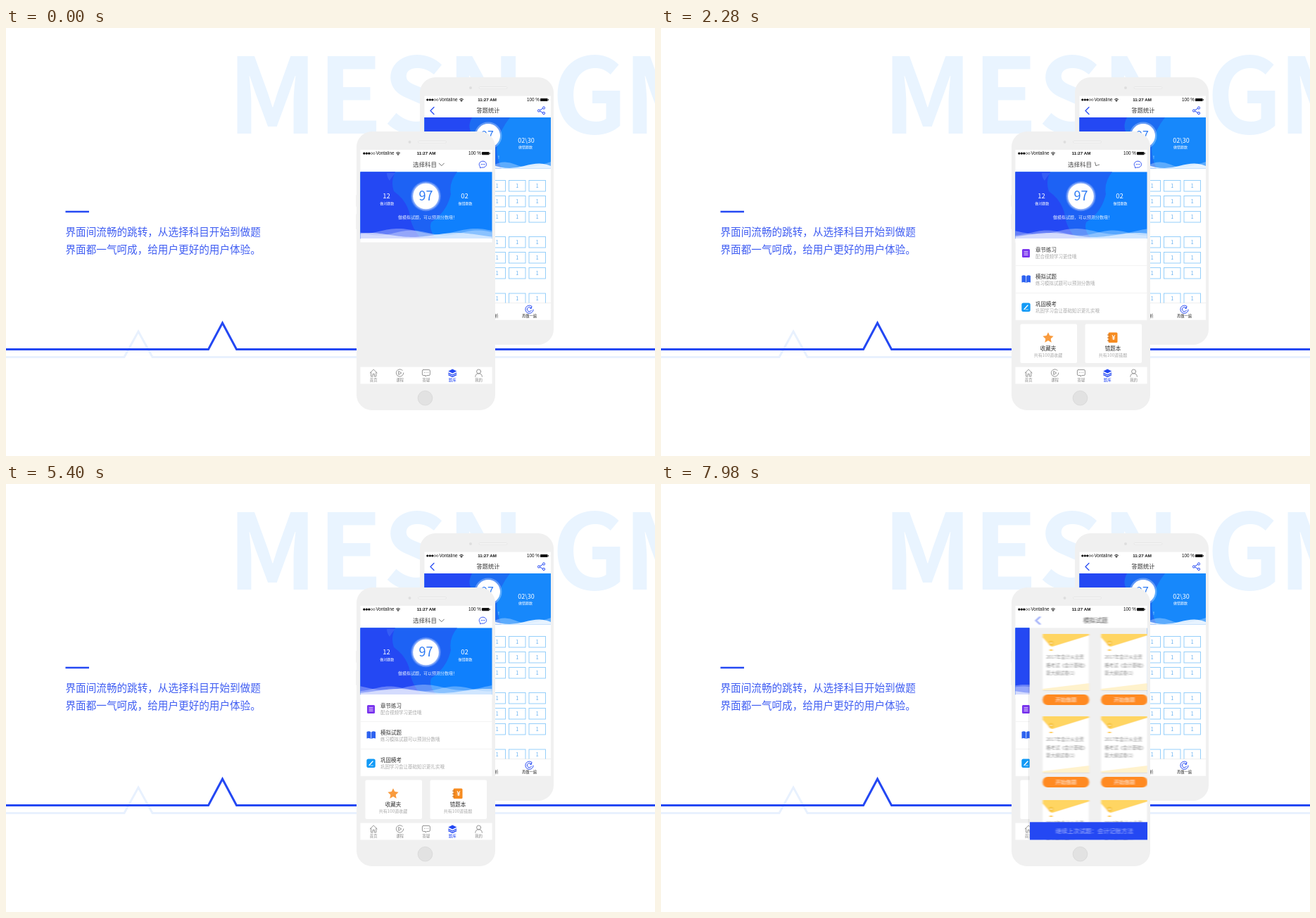
An HTML page for the animation above (8000 ms loop, 922 by 608 pixels).

```html
<!DOCTYPE html>
<html lang="zh-CN">
<head>
<meta charset="utf-8">
<title>App transitions</title>
<style>
html, body { margin: 0; width: 100%; height: 100%; overflow: hidden; background: #fff; }
svg { display: block; font-family: "Noto Sans CJK SC", "Noto Sans CJK JP", "Noto Sans CJK", sans-serif; }
.latin { font-family: "Liberation Sans", Arial, sans-serif; }
.line { fill: none; stroke-linecap: round; stroke-linejoin: round; }
</style>
</head>
<body>
<svg id="stage" width="922" height="608" viewBox="0 0 922 608"></svg>
<script>
const BLUE = '#2448f3', GREY = '#f0f0f0';
const stage = document.getElementById('stage');

const rect = (x, y, w, h, fill, more = '') =>
  `<rect x="${x}" y="${y}" width="${w}" height="${h}" fill="${fill}" ${more}/>`;
const circle = (x, y, r, fill, more = '') => `<circle cx="${x}" cy="${y}" r="${r}" fill="${fill}" ${more}/>`;
const path = (d, fill, more = '') => `<path d="${d}" fill="${fill}" ${more}/>`;
const line = (d, color, w = 1, more = '') =>
  `<path class="line" d="${d}" stroke="${color}" stroke-width="${w}" ${more}/>`;
const text = (s, x, y, size, fill, more = '') =>
  `<text x="${x}" y="${y}" font-size="${size}" fill="${fill}" ${more}>${s}</text>`;
const mid = (s, x, y, size, fill, more = '') => text(s, x, y, size, fill, `text-anchor="middle" ${more}`);
const group = (s, more) => `<g ${more}>${s}</g>`;
const at = (x, y, s) => group(s, `transform="translate(${x} ${y})"`);
const clip = (id, x, y, w, h) => `<clipPath id="${id}">${rect(x, y, w, h, '#000')}</clipPath>`;

// Phone shell with its top-left corner at x, y
function shell(x, y, w, h) {
  const c = x + w / 2;
  return rect(x - 1, y + 90, 3, 17, '#f3f3f3', 'rx="1"') + rect(x - 1, y + 117, 3, 22, '#f3f3f3', 'rx="1"') +
    rect(x, y, w, h, GREY, 'rx="22"') +
    circle(c - 23, y + 15, 2, '#dedede') +
    rect(c - 11, y + 13.5, 40, 2.6, '#f5f5f5', 'rx="1.3" stroke="#e0e0e0" stroke-width=".6"');
}

// Carrier, clock and battery; y is the middle of the row
function statusBar(x, right, center, y) {
  let s = '';
  for (let i = 0; i < 5; i++)
    s += circle(x + 1.8 + i * 3.5, y, 1.35, i < 3 ? '#111' : 'none', 'stroke="#111" stroke-width=".5"');
  s += text('Vontaline', x + 18.5, y + 2.2, 6.3, '#111');
  s += at(x + 50, y, line('M-2.6-.7Q0-3 2.6-.7M-1.5.7Q0-.6 1.5.7', '#111', .9) + circle(0, 1.9, .8, '#111'));
  s += mid('11:27 AM', center, y + 2.2, 6.2, '#111', 'font-weight="700"');
  s += text('100 %', right - 31, y + 2.2, 6.3, '#111');
  s += rect(right - 12, y - 2.1, 10.5, 4.2, '#111', 'rx=".7"') + rect(right - 1.2, y - .9, 1, 1.8, '#111');
  return group(s, 'class="latin"');
}

function backPhone() {
  let s = shell(588, 70, 190, 380) + rect(594.5, 96.5, 179.5, 318, '#fff');
  s += statusBar(597, 771, 683.5, 102) + mid('答题统计', 685, 120.3, 8.2, '#333');
  s += line('M608 112.5L603 117.5L608 122.5', BLUE, 1.2);
  s += line('M764 113.5L757 117.5L764 121', BLUE, 1);
  s += [[764, 113.5], [757, 117.5], [764, 121]].map(p => circle(...p, 1.6, '#fff', `stroke="${BLUE}"`)).join('');
  s += rect(594.5, 127, 179.5, 72.5, '#1788fb') + path('M594.5 127H716Q686 165 704 199.5H594.5Z', '#1c6cf2') +
    path('M594.5 127H662Q654 142 664 152Q674 168 676 199.5H594.5Z', BLUE);
  s += path('M690 196Q707 186 724 194T774 190V199.5H690Z', '#fff', 'opacity=".3"') +
    path('M690 194Q712 203 736 196T774 196V199.5H690Z', '#fff', 'opacity=".85"');
  s += circle(685, 153, 19.5, '#fff', 'opacity=".3"') + circle(685, 153, 17, '#fff');
  s += mid('97', 684, 158, 16, '#2b79f3', 'font-weight="300"');
  s += mid('02\\30', 739, 163, 9, '#fff') + mid('做错题数', 738, 171, 5, '#fff') + text('!', 699, 186, 6, '#fff');
  for (const y of [216.5, 238.5, 260.5, 296.5, 318.5, 340.5, 377])
    for (const x of [686, 714.5, 743])
      s += rect(x, y, 23.5, 15.5, '#fff', 'stroke="#8bcbfa" stroke-width=".9"') + mid('1', x + 11.7, y + 10.4, 7, '#5cabf0');
  s += rect(594.5, 391, 179.5, 23.5, '#fff') + rect(594.5, 390.5, 179.5, .6, '#e4e4e4');
  s += circle(743.5, 399.7, 5.6, 'none', `stroke="${BLUE}" stroke-width="1" stroke-dasharray="30 5"`) +
    line('M746 397.6A3.2 3.2 0 1 0 746.5 401M746.6 396V398.2H744.4', BLUE, 1);
  s += mid('再做一遍', 743.5, 411, 5.3, '#333') + mid('析', 697, 411, 5.3, '#333');
  return s;
}

function banner() {
  return rect(503.5, 204.5, 187, 95, '#0f80fd') +
    path('M503.5 204.5H641Q629 219 632 236Q626 262 604 276Q600 288 612 299.5H503.5Z', '#1d62f4') +
    path('M503.5 204.5H553Q546 218 551 232Q571 246 574 268Q576 284 590 299.5H503.5Z', BLUE) +
    path('M541 206H553Q547 213 545 217Q541 212 541 206Z', '#3f6bf6', 'opacity=".6"') +
    '<path id="wave1" fill="#fff" opacity=".3"/><path id="wave2" fill="#fff" opacity=".3"/><path id="wave3" fill="#fff" opacity=".6"/>' +
    circle(596.5, 239, 21.5, '#fff', 'opacity=".18"') + circle(596.5, 239, 20, '#fff', 'opacity=".35"') +
    circle(596.5, 239, 18.3, '#fff') + mid('97', 596.5, 245, 18, '#2b79f3', 'font-weight="300"') +
    mid('12', 540.5, 242, 9.5, '#fff') + mid('做对题数', 541.3, 250.5, 5, '#fff') +
    mid('02', 651.5, 242, 9.5, '#fff') + mid('做错题数', 652.5, 250.5, 5, '#fff') +
    text('做模拟试题，可以预测分数哦！', 557, 271, 6, '#e6f0ff');
}

const rowIcons = [
  rect(513, 314, 11, 12, '#7a35ee', 'rx="1.5"') + line('M516 317.7H521M516 320H521M516 322.3H521', '#fff', .8),
  path('M512.5 352Q516 350.5 518.4 352.4V362Q515.5 360.4 512.5 361.5ZM525 352Q521.500 350.5 519.1 352.4V362Q522 360.4 525 361.5Z', '#2d62f0'),
  rect(512.3, 390.5, 12.4, 12.4, '#129af6', 'rx="2.5"') + line('M516 399.500L521 394', '#fff', 1.4) + line('M518 400H521.5', '#fff', .7)
];
const row = (i, y, h, title, note) =>
  rect(503.5, y, 187, h, '#fff') + rect(503.5, y + h - .7, 187, .7, '#eee') + rowIcons[i] +
  text(title, 532, [318, 355.7, 395][i], 7.5, '#333') + text(note, 532, [327, 364.9, 404][i], 6.5, '#aaa');

const starPath = () => 'M' + Array.from({ length: 10 }, (_, i) => {
  const r = i % 2 ? 3.9 : 8, a = i * Math.PI / 5;
  return `${(550 + r * Math.sin(a)).toFixed(1)} ${(440.2 - r * Math.cos(a)).toFixed(1)}`;
}).join('L') + 'Z';
const card = (x, icon, title, note) =>
  rect(x, 420.5, 80.5, 55.5, '#fff', 'rx="2"') + icon +
  mid(title, x + 39.5, 457.5, 7.5, '#333') + mid(note, x + 39.5, 466.6, 6.1, '#aaa');
const notebook = rect(635.5, 432.5, 13, 14.5, '#f68b20', 'rx="1.5"') +
  line('M634.5 436H637M634.5 440H637M634.5 444H637', '#b9661a', 1) + mid('¥', 642.8, 443.4, 9, '#fff', 'font-weight="700"');

const parts = [
  row(0, 299, 39, '章节练习', '配合视频学习更佳哦'),
  row(1, 338, 39, '模拟试题', '练习模拟试题可以预测分数哦'),
  row(2, 377, 38.5, '巩固模考', '巩固学习会让基础知识更扎实哦'),
  card(510.5, path(starPath(), '#f99b3e'), '收藏夹', '共有100道收藏'),
  card(602.5, notebook, '错题本', '共有100道错题')
];

function tabBar() {
  const icons = [
    'M-5 0L0-5L5 0M-3.6-1V5H-1.2V1.500H1.200V5H3.600V-1',
    'M5.200 0A5.200 5.200 0 1 1 3.700-3.700M-1.500-2.300L2.200 0L-1.500 2.300Z',
    'M-4-4.500H4Q5.500-4.500 5.500-3V2Q5.500 3.500 4 3.500H1L-1 5V3.500H-4Q-5.500 3.500-5.500 2V-3Q-5.500-4.500-4-4.500ZM-2.500-.5H-2.400M0-.5H.1M2.500-.5H2.600',
    '',
    'M-4.800 5.300Q-4.500 .8 0 .8T4.800 5.300M3 -2A3 3 0 1 1-3-2A3 3 0 1 1 3-2'
  ];
  return rect(503.5, 481.500, 187, 24, '#fff') + ['首页', '课程', '答疑', '题库', '我的'].map((s, i) => {
    const on = i === 3;
    return at(522.2 + i * 37.35, 490, on
      ? path('M0-5.500L6-2.500L0 .5L-6-2.500Z', BLUE) + line('M-5.500 .3L0 3L5.500 .3M-5.500 2.700L0 5.400L5.500 2.700', BLUE, 1.3)
      : line(icons[i], '#8a8a8a', .9)) +
      mid(s, 522.2 + i * 37.35, 501.700, 5.4, on ? BLUE : '#888');
  }).join('');
}

function subjects() {
  let s = rect(503.5, 204.5, 186.5, 174, '#fff') + rect(503.5, 204.3, 187, .7, '#e6e6e6') +
    rect(503.5, 378.5, 187, 127, '#000', 'opacity=".2"');
  [['会计从业', 223.5], ['初级会计职务', 269], ['中级会计职务', 315]].forEach(([n, y]) => s += text(n, 514.5, y, 7.5, '#444'));
  [['会计基础', 0, 232.5], ['财经法规', 1, 232.5], ['初级经济法基础', 0, 278.3], ['初级会计实务', 1, 278.3],
   ['经济法', 0, 324.5], ['中级会计实务', 1, 324.5], ['财务管理', 0, 347.500]].forEach(([n, col, y]) => {
    s += rect(522 + col * 80.3, y, 69.5, 14.7, '#ececec') + mid(n, 556.7 + col * 80.3, y + 10, 7, '#999');
  });
  return s;
}

const paper = (x, y) => at(x, y,
  rect(.5, 1, 66, 80, '#000', 'opacity=".08"') + rect(0, 0, 66, 80, '#fff') +
  path('M0 80V78L66 70V80Z', '#fff2cc') +
  path('M0 0H66V2L14 18Q10 18 8 14L0 5Z', '#ffd562') +
  circle(12, 13, 3.4, '#f8c544') + line('M10.500 13H13.500', '#fff', .9) + rect(9.500, 22, 5, 1.800, '#ffc83d', 'rx=".9"') +
  ['2017年会计从业资', '格考试《会计基础》', '新大纲试卷(1)'].map((s, i) => text(s, 5, 35 + i * 11.500, 6.5, '#888')).join('') +
  rect(0, 86, 66, 15, '#ff8a22', 'rx="7"') + mid('开始做题', 33, 96.200, 7.4, '#fff3e4'));

// Sliding page, its left edge at x = 0
function examPage() {
  let s = line('M14.500 189L9 194L14.500 199', '#8d9ff8', 2) + mid('模拟试题', 93.5, 197, 8.7, '#555');
  for (const y of [213, 330, 449]) s += paper(18.5, y) + paper(101.500, y);
  return rect(-2, 204.5, 2, 301, '#000', 'opacity=".07"') + rect(0, 188, 190, 17, '#fff') +
    rect(0, 204.5, 190, 301, GREY) + group(s, 'filter="url(#blur)"') +
    rect(0, 480.300, 190, 25.2, BLUE) + group(mid('继续上次试题：会计记账方法', 92, 496, 8.5, '#a9b7fb'), 'filter="url(#blur)"');
}

function frontPhone() {
  return shell(498, 147, 197, 396) + rect(503.5, 173, 187, 332, GREY) + rect(503.5, 173, 187, 31.500, '#fff') +
    circle(595.5, 525.7, 10.3, '#e2e2e2', 'stroke="#d6d6d6" stroke-width=".8"') +
    text('选择科目', 578, 197.200, 8.5, '#444') + line('M-3.500-1.800L0 1.800L3.500-1.800', '#666', .9, 'id="chevron"') +
    at(677.6, 194, line('M-4 4.500L-4.300 2.600A5.200 4.600 0 1 1-1.500 4.200Z', BLUE, .9) +
      [-2.2, 0, 2.2].map(x => circle(x, -.2, .7, BLUE)).join('')) +
    banner() + rect(503.5, 299, 187, 5, '#fff') + rect(503.5, 304, 187, 1, '#f7f7f7') +
    group(parts.map(s => `<g class="part">${s}</g>`).join(''), 'clip-path="url(#list)"') +
    tabBar() + group(subjects(), 'id="subjects"') +
    circle(0, 0, 0, 'none', 'id="ripple" stroke="#f0f0f0" stroke-width="1"') +
    group(group(examPage(), 'id="page"'), 'clip-path="url(#screen)"') +
    statusBar(507, 688, 597, 178.2);
}

stage.innerHTML = `<defs>${clip('list', 503.5, 299, 187, 183)}${clip('screen', 503.5, 188, 187, 317.5)}
  <filter id="blur" x="-5%" width="110%"><feGaussianBlur stdDeviation=".9 .25"/></filter></defs>` +
  group([['M', 378.5], ['E', 489], ['S', 582], ['N', 682], ['G', 829], ['M', 940.5]]
    .map(([c, x]) => mid(c, x, 150, 149, '#e9f4ff')).join(''), 'font-weight="700"') +
  rect(84.5, 259.700, 33.5, 2.500, BLUE) +
  group(text('界面间流畅的跳转，从选择科目开始到做题', 84.500, 295, 14.6, '#3f5df2') +
    text('界面都一气呵成，给用户更好的用户体验。', 84.500, 320, 14.6, '#3f5df2'), 'font-weight="300"') +
  path('M0 467.500H168L188 431L208 467.500H922', 'none', 'stroke="#e8f1fe" stroke-width="3"') +
  path('M0 456.500H287.500L307.500 419L327.500 456.500H922', 'none', `stroke="${BLUE}" stroke-width="3"`) +
  backPhone() + frontPhone();

const $ = id => document.getElementById(id);
const partNodes = [...document.querySelectorAll('.part')];
const ease = (t, start, span) => {
  const u = Math.min(1, Math.max(0, (t - start) / span));
  return u * u * (3 - 2 * u);
};
const taps = [[3780, 552, 240.500], [4470, 593, 429.500], [6270, 545, 317]];

function wave(id, base, amp, length, phase) {
  let d = 'M503.5 299.5';
  for (let x = 503.5; x <= 690.5; x += 3.4)
    d += `L${x.toFixed(1)} ${(base - amp * Math.sin((x - 503.5) / length * 2 * Math.PI + phase)).toFixed(2)}`;
  $(id).setAttribute('d', d + 'L690.5 299.5Z');
}

function draw(t) {
  const turn = Math.min(t, 7640) / 3240 * 2 * Math.PI;
  wave('wave1', 289, 4, 110, turn - 1.5);
  wave('wave2', 291, 3.500, 94, -turn + 3);
  wave('wave3', 294, 3, 125, turn + 1);

  partNodes.forEach((node, i) => {
    const dy = 190 * (1 - ease(t, 60 + i * 160, 1200));
    node.setAttribute('transform', `translate(0 ${dy.toFixed(2)})`);
  });

  const angle = 180 * (ease(t, 2160, 480) - ease(t, 4500, 510));
  $('chevron').setAttribute('transform', `translate(618.8 194) rotate(${angle})`);
  $('subjects').style.display = t >= 3300 && t < 5220 ? '' : 'none';

  const tap = taps.find(([start]) => t >= start && t < start + 540);
  const ripple = $('ripple');
  ripple.style.display = tap ? '' : 'none';
  if (tap) {
    const u = (t - tap[0]) / 540;
    ripple.setAttribute('transform', `translate(${tap[1]} ${tap[2]})`);
    ripple.setAttribute('r', 3 + 6 * u);
    ripple.setAttribute('opacity', 1 - u);
    ripple.setAttribute('stroke', tap[0] > 6000 ? '#fff' : '#ececec');
  }

  const x = 693 - 189 * ease(t, 7316, 830);
  $('page').setAttribute('transform', `translate(${x.toFixed(2)} 0)`);
}

function frame() {
  draw(Math.floor(performance.now() % 8000 / 30) * 30);
  requestAnimationFrame(frame);
}
frame();
</script>
</body>
</html>
```
